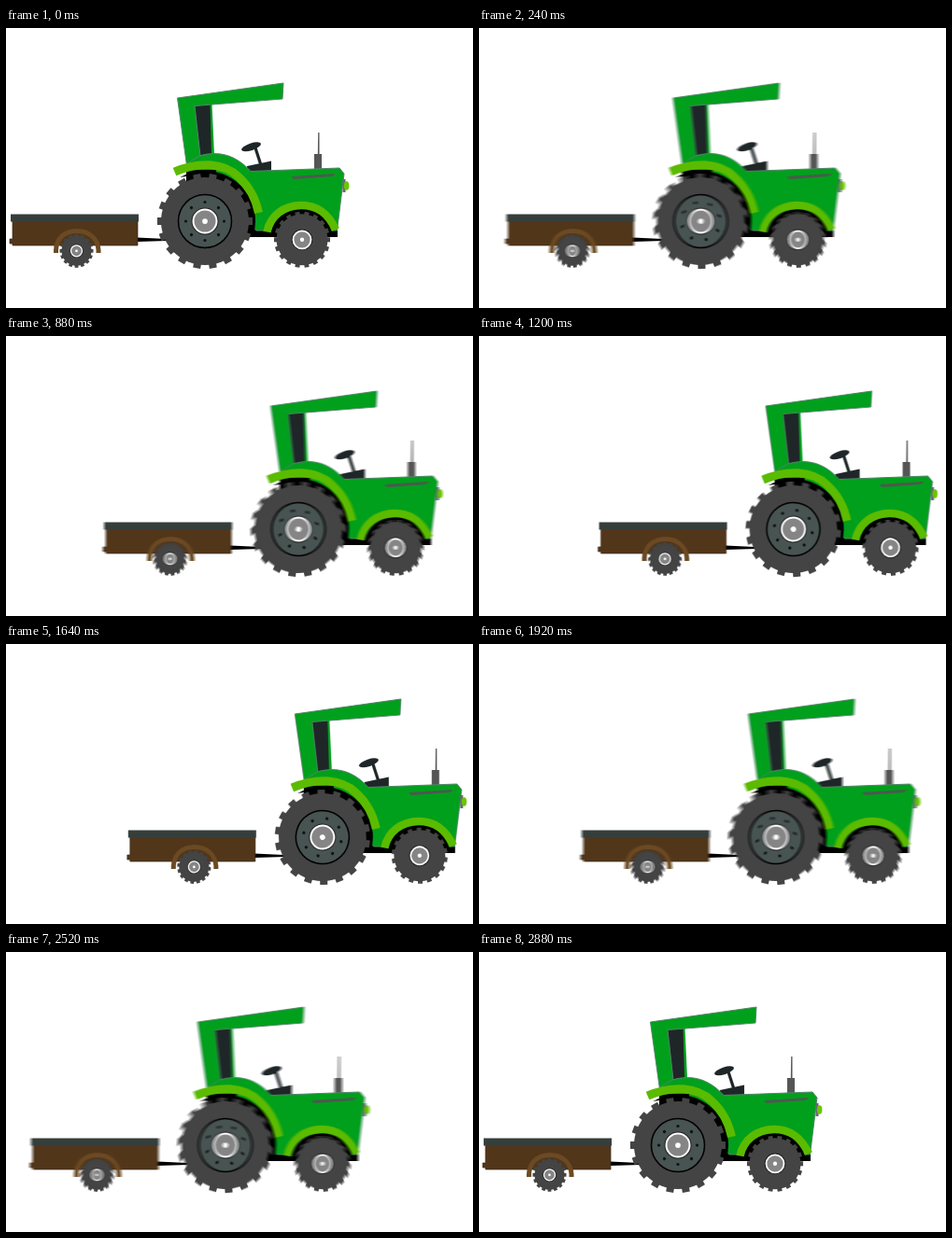
An HTML page with a canvas for the animation above (3.12 s loop, 500 px wide and 300 px high).

```html
<!DOCTYPE html>
<html>
<head>
<meta charset="utf-8">
<title>Tractor</title>
<style>
html, body { margin: 0; width: 100%; height: 100%; overflow: hidden; background: #fff }
canvas { display: block }
</style>
</head>
<body>
<canvas id="stage" width="500" height="300"></canvas>
<script>
const LOOP = 3120, STEP = 40, TRAVEL = 127, SAMPLES = 6;
const GREEN = '#00a01c', LIME = '#5bbb00', TYRE = '#444', DARK = '#1f2628';
const stage = document.getElementById('stage').getContext('2d');
const buffer = document.createElement('canvas');
buffer.width = 500;
buffer.height = 300;
const c = buffer.getContext('2d');

// Quick start and soft stop going out, sine ease coming back
function offset(t) {
  t = (t + LOOP) % LOOP;
  if (t < 1360) {
    const u = t / 1360, s = 0.92;
    return TRAVEL * (s * u + (3 - 2 * s) * u * u + (s - 2) * u ** 3);
  }
  const u = Math.min(1, Math.max(0, (t - 1560) / 1320));
  return TRAVEL * (1 + Math.cos(Math.PI * u)) / 2;
}

function paint(path, fill, stroke, width = 1) {
  if (fill) { c.fillStyle = fill; c.fill(path); }
  if (stroke) { c.strokeStyle = stroke; c.lineWidth = width; c.stroke(path); }
}

function shape(d, ...style) {
  paint(new Path2D(d), ...style);
}

function oval(x, y, rx, ry, tilt, ...style) {
  const p = new Path2D();
  p.ellipse(x, y, rx, ry, tilt, 0, 2 * Math.PI);
  paint(p, ...style);
}

function disc(x, y, r, ...style) {
  oval(x, y, r, r, 0, ...style);
}

function ring(n, r, phase, draw) {
  for (let i = 0; i < n; i++) {
    c.save();
    c.rotate(2 * Math.PI * (i + phase) / n);
    c.translate(0, -r);
    draw();
    c.restore();
  }
}

function wheel(x, y, r, lugs, phase, lugWidth, lugHeight, angle, drawHub) {
  c.save();
  c.translate(x, y);
  c.rotate(angle);
  disc(0, 0, r - lugHeight, TYRE);
  ring(lugs, r, phase, () => {
    c.fillStyle = TYRE;
    c.fillRect(-lugWidth / 2, 0, lugWidth, lugHeight + 2);
  });
  drawHub();
  c.restore();
}

function hub(r, rim) {
  disc(0, 0, r + rim, '#222');
  disc(0, 0, r, '#858585', '#fff', rim);
  disc(0, 0, r * 0.23, '#fff');
}

function trailer(x) {
  shape('M140 224.5L172 226V228L140 229Z', '#000');
  shape('M7 206H141V233H7V231H4V226H7Z', '#52361a', '#3c2a17', 0.7);
  shape('M5 199.5H142V207.5H5Z', '#353e3b');
  shape('M53.5 241V238C54 225 63 217.5 76 217.5S98.5 226 99 238V241', null, '#6b4a23', 5);
  wheel(75.5, 238.8, 18, 16, 0, 3.8, 2, x / 17.5, () => hub(6, 1.3));
}

function cab() {
  shape('M334.2 112H335.5V136H333.8Z', '#555');
  shape('M330 135H338V152H330Z', '#555');
  shape('M266.5 127L273 147', null, DARK, 3.2);
  oval(262.5, 127.3, 11, 3.8, -0.33, DARK);
  shape('M258 148L284 142.5V155H258Z', DARK);
  shape('M201 83L219 81.5L221 140L205 142Z', DARK);
  shape('M183.5 75L297 59L296 76L202 83.5L208 137L193.5 147Z', GREEN, '#55866a');
  shape('M218.5 82H220.5L223 136H220Z', GREEN);
}

function body() {
  shape('M193 152H240L262 180L268 217H355V224H245L200 190Z', '#000');
  shape('M193 149L194 145L207 137C228 131 246 136 262 153.5L357 150L362 156L354.5 217H268Z', GREEN, '#55866a');
  // Wheel wells
  disc(213, 207, 54, '#000');
  shape('M193 152H225V162H193Z', '#000');
  shape('M283 220C287 204 297 194 317 194S345 204 349 220Z', '#000');
  // Fenders
  shape('M180.5 154C206 143 233 144 249 159.5C263 172 268 186 270.5 198', null, LIME, 9);
  shape('M279.5 218.5C283 201 298 190 316 190S345 199 353 216', null, LIME, 8.5);
  shape('M306 159.5L352 156.5L349 158.5L308 161.5Z', '#555', '#555', 0.8);
  shape('M360.5 162H363.5V176H360.5Z', '#667');
  oval(364.6, 169, 2.8, 4.8, 0, '#6bc600');
}

function tractor(x) {
  cab();
  // Keep the rear wheel well inside the fender
  c.save();
  c.clip(new Path2D('M179 148L193 140L207 130H375V224H245L213 207L193 190V159L179 161Z'));
  body();
  c.restore();
  wheel(213, 207, 51, 18, 0.5, 8, 4, x / 48.6, () => {
    disc(0, 0, 28.5, '#485452', '#000', 1.5);
    ring(8, 20.5, 0, () => disc(0, 0, 1.6, '#111'));
    hub(12.5, 2);
  });
  wheel(317, 226.8, 30, 18, 0.5, 5, 2.5, x / 29, () => hub(9.5, 1.8));
}

function scene(x) {
  c.fillStyle = '#fff';
  c.fillRect(0, 0, 500, 300);
  c.save();
  c.translate(x, 0);
  trailer(x);
  tractor(x);
  c.restore();
}

function frame(now) {
  const t = Math.floor(now % LOOP / STEP) * STEP;
  const x = offset(t), blur = x - offset(t - STEP);
  // Average several positions for motion blur
  for (let i = 0; i < SAMPLES; i++) {
    scene(x + blur * ((i + 0.5) / SAMPLES - 0.5));
    stage.globalAlpha = 1 / (i + 1);
    stage.drawImage(buffer, 0, 0);
  }
  requestAnimationFrame(frame);
}

frame(0);
</script>
</body>
</html>
```
